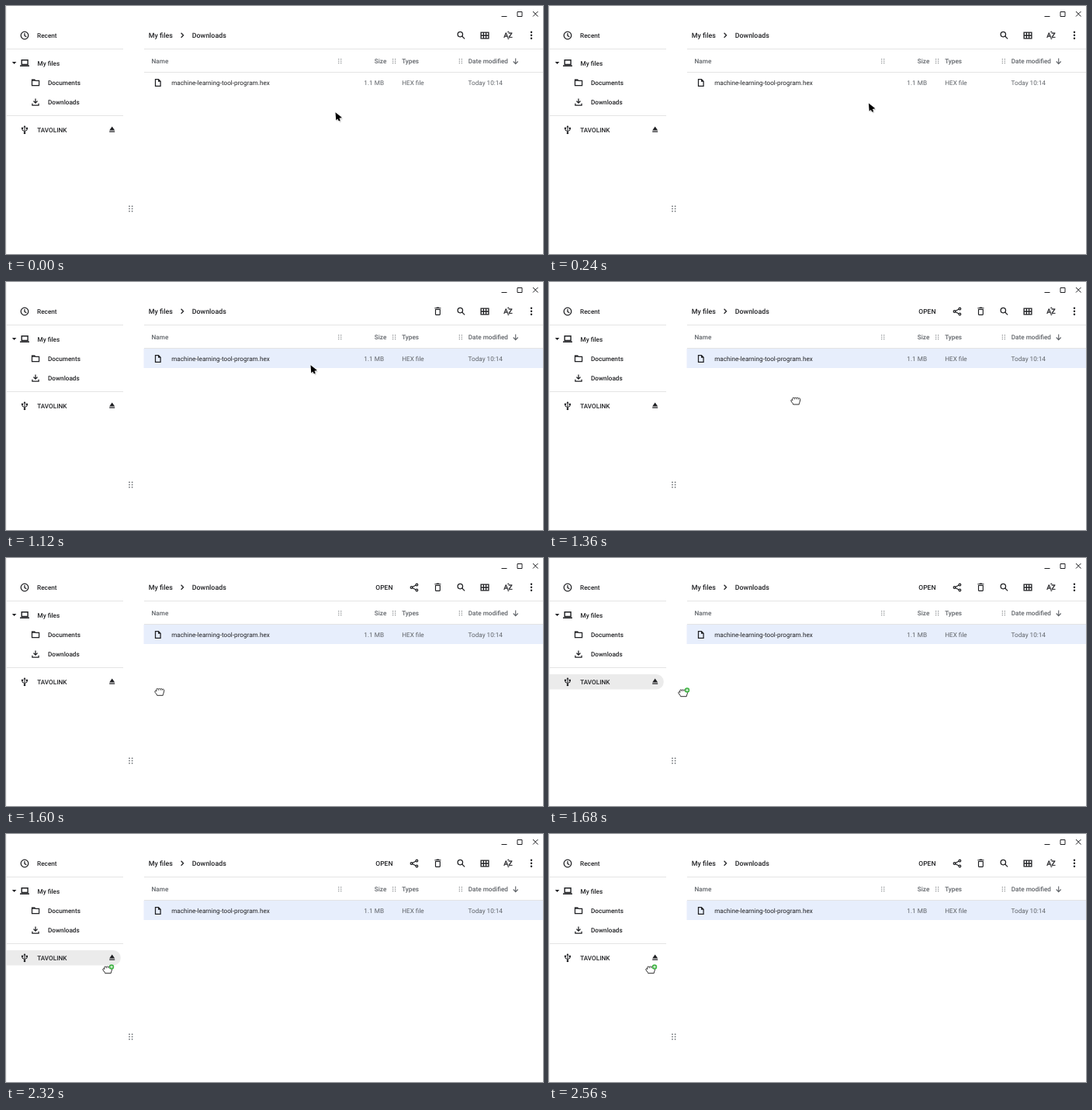
An HTML page for the animation above (3600 ms loop, 692 by 320 pixels).

```html
<!DOCTYPE html>
<html lang="en">
<head>
<meta charset="utf-8">
<title>Copy a file to a drive</title>
<style>
  html, body { margin: 0; width: 100%; height: 100%; overflow: hidden; background: #fff; }
  svg { display: block; width: 692px; height: 320px; }
  text { font: 500 8.2px Roboto, Arial, sans-serif; fill: #202124; text-rendering: geometricPrecision; }
  .crumb { font-size: 8.85px; }
  .head { fill: #5f6368; }
  .file { font-weight: 400; font-size: 8.17px; }
  .info { fill: #5f6368; font-weight: 400; font-size: 8.2px; }
  .end { text-anchor: end; }
  .line { fill: none; stroke: #202124; stroke-width: 1.25; }
  .rule { fill: none; stroke: #e4e4e4; }
  .icon { fill: #202124; }
</style>
</head>
<body>
<svg viewBox="0 0 692 320">
  <rect width="692" height="320" fill="#fff"/>
  <path class="rule" d="M0 55.5H151M0 141.5H151M178 55.5H692M178 85.5H692"/>
  <path d="M.5 0V320" stroke="#f0f0f0"/>
  <rect id="row" x="177.5" y="86" width="514.5" height="25" fill="#e7eefc"/>
  <path id="drop" d="M0 150H138a9.8 9.8 0 0 1 0 19.6H0Z" fill="#ebebeb"/>

  <!-- window buttons -->
  <path class="line" style="stroke-width:1" d="M638.5 13.5h7M659 7.5h6v6h-6zM679 7l6.5 6.5m0-6.5L679 13.5"/>

  <!-- sidebar -->
  <g class="line">
    <circle cx="24" cy="38" r="4.8"/>
    <path d="M24 35v3.3l2.4 1.4"/>
    <path d="M20.2 69.7h7.9v5.8h-7.9zM18 77.2h12" stroke-width="1.4"/>
    <path d="M33.5 95.2h3.4l1 1.2h4.7v6.2h-9.1z"/>
    <path d="M33.5 95.8h3.6" stroke-width="1.8"/>
    <path d="M38 119.4v5.6m-2.6-2.4l2.6 2.6 2.6-2.6M33.9 125.7v2.3h8.2v-2.3"/>
    <path d="M24 155.5v8M21 158v2.2l3 1.7 3-1.7v-2.2" stroke-width="1"/>
  </g>
  <g class="icon">
    <path d="M7.8 72h5.6l-2.8 2.9z"/>
    <path d="M22.4 156.4L24 154l1.6 2.4zM25.8 156.8h2.2v2.1h-2.2z"/>
    <circle cx="21" cy="157.8" r="1.2"/>
    <circle cx="24" cy="163.9" r="1.3"/>
    <path d="M133.2 160.4l3.5-4.8 3.5 4.8zM133.2 161.4h7v1.3h-7z"/>
  </g>
  <text x="40.1" y="41">Recent</text>
  <text x="40.5" y="76.6">My files</text>
  <text x="54" y="101.8">Documents</text>
  <text x="54" y="127">Downloads</text>
  <text x="40.2" y="162.5">TAVOLINK</text>

  <!-- toolbar -->
  <text class="crumb" x="183.8" y="40.7">My files</text>
  <path class="line" d="M225.6 34.8l3 3-3 3"/>
  <text class="crumb" x="239.8" y="40.7">Downloads</text>
  <g id="extra">
    <text x="476.3" y="40.7" style="font-size:8.5px">OPEN</text>
    <g class="line">
      <path d="M529.3 34.5l-6.8 3.5 6.8 3.5"/>
      <g fill="#fff"><circle cx="529.4" cy="34.5" r="1.3"/><circle cx="522.5" cy="38" r="1.3"/><circle cx="529.4" cy="41.5" r="1.3"/></g>
    </g>
  </g>
  <g id="trash" class="icon" transform="translate(556.4 37.8) scale(.58) translate(-12 -12)">
    <path fill-rule="evenodd" d="M6 19a2 2 0 0 0 2 2h8a2 2 0 0 0 2-2V7H6zM8 9h8v10H8zM15.5 4l-1-1h-5l-1 1H5v2h14V4z"/>
  </g>
  <g class="line" style="stroke-width:1.3">
    <circle cx="585.3" cy="36.6" r="3.2"/>
    <path d="M587.6 38.9l3.5 3.5"/>
    <path d="M612.1 34.2h9.8v7.6h-9.8zM612 38h10M615.4 34v8M618.6 34v8"/>
  </g>
  <g class="icon" transform="translate(647 37.7) scale(.54) translate(-12 -12)">
    <path fill-rule="evenodd" d="M14.9 4.6h-4.7l2.4-2.3zM10.3 19.4h4.6l-2.3 2.3zM6.1 6.3L1.6 17.7h1.9l.9-2.4h5.1l.9 2.4h1.9L7.7 6.3zM5 13.6l1.9-5.2 2 5.2zM15.7 16.1h6.2v1.6h-8.6v-1.3l5.9-8.5h-5.8V6.3h8.3v1.2z" stroke="#202124" stroke-width=".5"/>
  </g>
  <g class="icon"><circle cx="677" cy="33.8" r="1.2"/><circle cx="677" cy="37.8" r="1.2"/><circle cx="677" cy="41.8" r="1.2"/></g>

  <!-- file list -->
  <g id="grips" fill="#6b6f73"></g>
  <text class="head" x="187.5" y="74">Name</text>
  <text class="head end" x="490.3" y="74">Size</text>
  <text class="head" x="510.2" y="74">Types</text>
  <text class="head" x="595.7" y="74">Date modified</text>
  <path class="line" style="stroke:#5f6368;stroke-width:1.1" d="M656.7 67.5v7m-3-3l3 3.1 3-3.1"/>
  <path class="line" d="M192.5 94.6h4l2.6 2.7v6h-6.6z"/>
  <path class="icon" d="M196 94.2l3.5 3.6H196z"/>
  <text class="file" x="213.2" y="101.7">machine-learning-tool-program.hex</text>
  <text class="info end" x="487" y="101.7">1.1 MB</text>
  <text class="info" x="510.2" y="101.7">HEX file</text>
  <text class="info" x="595.5" y="101.7">Today 10:14</text>

  <!-- pointers, drawn around their own origin -->
  <g id="arrow">
    <path d="M1 1.4L1.8 11.8 4 10l1.5 3 2-.9-1.4-3 3.6-.5z" fill="#000" opacity=".18"/>
    <path d="M0 0L.8 10.2 2.9 8.3l1.5 3 1.9-.9-1.4-3 3.6-.6z" fill="#000" stroke="#fff" stroke-width=".8" paint-order="stroke"/>
  </g>
  <g id="hand">
    <path d="M-3.3 4.7C-3.6 2.8-6.4 1.2-6.2-.5c.2-1 1.4-.9 2.2-.1-.5-2-.4-3.2.7-3.4.8-.1 1.2.3 1.5.8.2-1.1 2.2-1.2 2.6-.1.5-.9 2.2-.8 2.5.2.8-.7 2.2-.2 2.4 1C6 .2 4.4 2.6 4.2 4.7Z" fill="#fff" stroke="#222" stroke-width=".95" stroke-linejoin="round"/>
    <path d="M-1.8-3.2l.3 1.5M.8-3.3l.1 1.5M3.3-3l-.2 1.5" fill="none" stroke="#222" stroke-width=".7"/>
    <g id="badge">
      <circle cx="5" cy="-3.5" r="3.2" fill="#45b649"/>
      <path d="M3.3-3.5h3.4M5-5.2v3.4" stroke="#fff" stroke-width=".9"/>
    </g>
  </g>
</svg>
<script>
const LOOP = 3600, STEP = 80;
const el = id => document.getElementById(id);
const show = (id, opacity) => el(id).setAttribute('opacity', Number(opacity));
const place = (id, [x, y]) => el(id).setAttribute('transform', `translate(${x} ${y})`);

// Dotted handles: two columns of three
function grip(cx, cy, dx, dy, r) {
  for (const i of [-1, 1]) for (const j of [-1, 0, 1]) {
    const dot = document.createElementNS('http://www.w3.org/2000/svg', 'circle');
    dot.setAttribute('cx', cx + i * dx);
    dot.setAttribute('cy', cy + j * dy);
    dot.setAttribute('r', r);
    el('grips').append(dot);
  }
}
for (const x of [430.3, 500.2, 585.8]) grip(x, 71.2, 1.5, 2.5, .62);
grip(160.8, 261.6, 1.8, 3.2, .9);

// Waypoints: time, x, y
const dragPath = [
  [1200, 380, 117], [1280, 352, 137], [1360, 318, 153.3], [1440, 280, 163],
  [1520, 239, 169.5], [1600, 198, 172.6], [1680, 173, 174], [1760, 154, 174.5],
  [1840, 142, 174.8], [1920, 133.5, 174.9], [2000, 133.5, 174.9], [2080, 131, 175]
];

function along(points, t) {
  const next = points.findIndex(p => p[0] > t);
  if (next < 0) return points[points.length - 1].slice(1);
  if (next === 0) return points[0].slice(1);
  const a = points[next - 1], b = points[next];
  const k = (t - a[0]) / (b[0] - a[0]);
  return [a[1] + (b[1] - a[1]) * k, a[2] + (b[2] - a[2]) * k];
}

function arrowAt(t) {
  const k = Math.min(1, t / 560);
  const e = k * k * (3 - 2 * k);
  return [424.5 - 32 * e, 137.3 - 30 * e];
}

function draw(time) {
  const t = Math.floor((time % LOOP) / STEP) * STEP;
  const dragging = t >= 1200;
  show('row', t >= 1120);
  show('trash', t >= 1120);
  show('extra', dragging);
  show('drop', t < 1680 || t >= 2560 ? 0 : t >= 2480 ? .5 : 1);
  show('arrow', !dragging);
  show('hand', dragging);
  show('badge', t >= 1680);
  place('arrow', arrowAt(t));
  place('hand', along(dragPath, t));
}

const start = performance.now();
function tick() {
  draw(performance.now() - start);
  requestAnimationFrame(tick);
}
tick();
</script>
</body>
</html>
```
